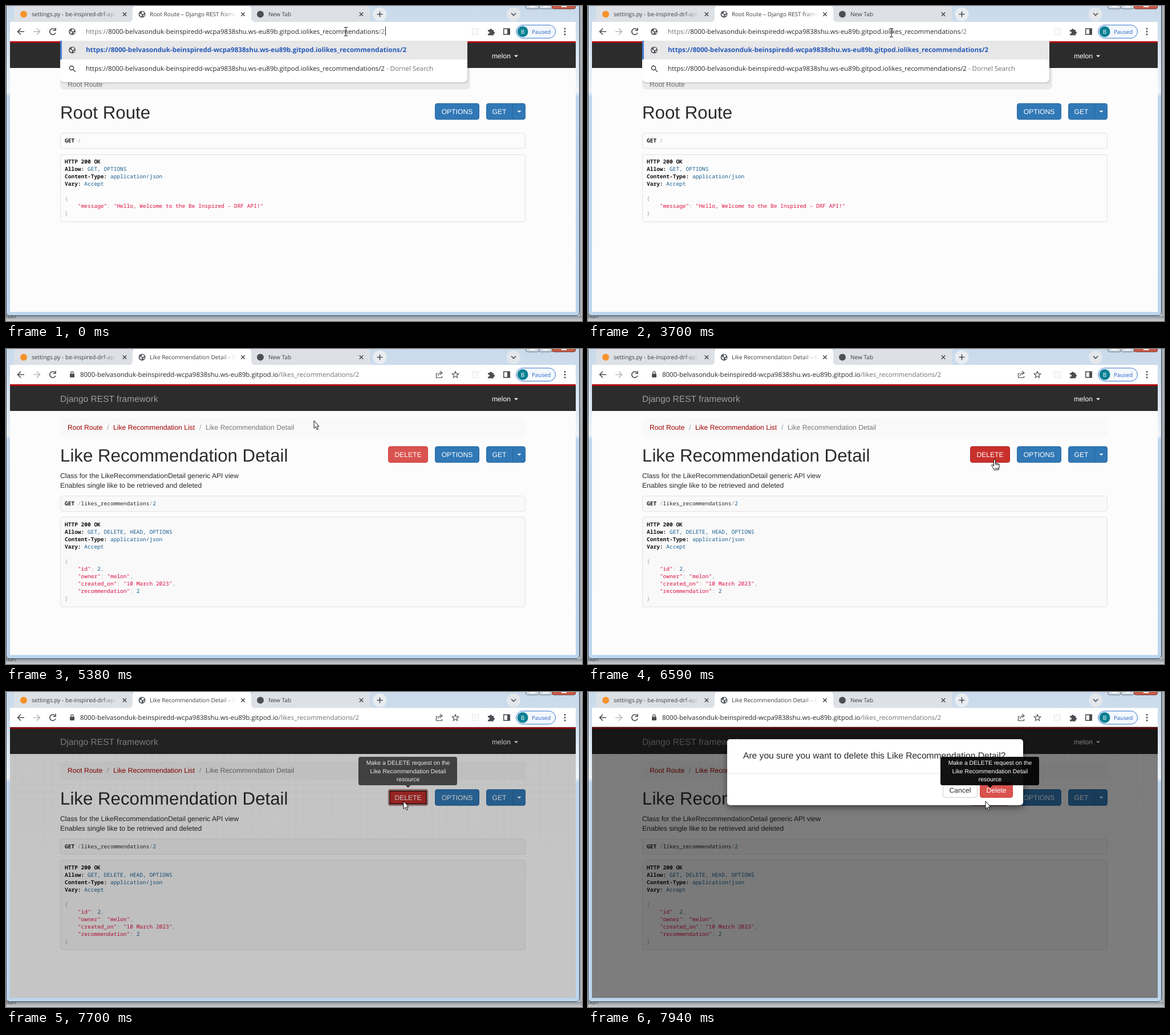
An HTML page that plays this animation: 1010x554 px, repeating every 7.99 s.

```html
<!DOCTYPE html>
<html lang="en">
<head>
<meta charset="utf-8">
<title>Deleting a like</title>
<style>
html, body { margin: 0; width: 100%; height: 100%; overflow: hidden; }
svg { display: block; width: 1010px; height: 554px; }
text { font: 12.15px "Liberation Sans", Arial, sans-serif; fill: #2a2a2a; white-space: pre; text-rendering: geometricPrecision; }
.ui { font: 10.1px "Open Sans", "Noto Sans", sans-serif; fill: #3c4043; }
.url { font: 11.48px "Open Sans", "Noto Sans", sans-serif; fill: #25282b; }
.pick { font: bold 11.6px "Open Sans", "Noto Sans", sans-serif; fill: #2558b8; }
.dim { fill: #6f7377; }
.h1 { font-size: 31.25px; }
.brand { font-size: 15.55px; fill: #9d9d9d; }
.link { fill: #a30000; }
.grey { fill: #777; }
.white { fill: #fff; }
.mid { text-anchor: middle; }
.tip { font-size: 10.4px; fill: #fff; text-anchor: middle; }
.ask { font-size: 15.6px; }
.code { font: 9.535px "Noto Sans Mono", "DejaVu Sans Mono", monospace; }
.b { font-weight: bold; fill: #111; }
.v { fill: #195f91; }
.s { fill: #d14; }
.p { fill: #93a1a1; }
.well { fill: var(--well); stroke: #e2e2e3; }
.icon { fill: none; stroke: #4a4d51; stroke-width: 1.6; }
.thin { stroke-width: 1.2; }
.raised { filter: drop-shadow(0 4px 6px rgba(0, 0, 0, .5)); }
</style>
</head>
<body>
<script>
const LOOP = 7990, LOADED = 4590, HOVER = 6480, MODAL = 7640;
const HOST = '8000-belvasonduk-beinspiredd-wcpa9838shu.ws-eu89b.gitpod.io';
const PATH = 'likes_recommendations';

const text = (x, y, cls, s) => `<text x="${x}" y="${y}" class="${cls}">${s}</text>`;
const rect = (x, y, w, h, fill, more = '') =>
  `<rect x="${x}" y="${y}" width="${w}" height="${h}" fill="${fill}" ${more}/>`;
const circle = (x, y, r, fill, more = '') => `<circle cx="${x}" cy="${y}" r="${r}" fill="${fill}" ${more}/>`;
const line = (d, cls = '') => `<path class="icon ${cls}" d="${d}"/>`;
const span = (cls, s) => `<tspan class="${cls}">${s}</tspan>`;
// Shown during each pair of times in the list
const during = (times, s) => `<g data-t="${times}">${s}</g>`;

const globe = (x, y) => circle(x, y, 6, '#55595d') +
  `<path d="M${x - 5} ${y - 1}l4 1 1 3-2 1zM${x} ${y - 5}l4 2-2 3-3-1zM${x + 2} ${y + 1}l3 0-2 3z" fill="#fff"/>`;
const cross = (x, y, r = 3.2) => line(`M${x - r} ${y - r}l${2 * r} ${2 * r}m0 ${-2 * r}l${-2 * r} ${2 * r}`);
const lens = (x, y) => line(`M${x + 2} ${y + 2}l4 4`) + circle(x - 1, y - 1, 3.6, 'none', 'class="icon"');
const caret = (x, times) => during(times, rect(x, 36, 1, 16, '#222'));
const down = (x, y) => `<path d="M${x - 3.5} ${y}h7l-3.5 3.5z" fill="#fff"/>`;

const button = (x, w, label, fill, edge) =>
  rect(x + .5, 171.5, w - 1, 28, fill, `rx="3.5" stroke="${edge}"`) + text(x + w / 2, 190, 'white mid', label);
const blue = (x, w, label) => button(x, w, label, '#3178b6', '#2e6da4');

const well = (y, h) => `<rect class="well" x="95.5" y="${y}.5" width="815" height="${h}" rx="3.5"/>`;
const code = (y, lines) => lines.map(([indent, s], i) =>
  text(103 + indent * 5.72, y + i * 13, 'code', s)).join('');
const head = (name, value) => [0, span('b', name + ':') + span('v', ' ' + value)];
const brace = s => [0, span('p', s)];
const pair = (key, value, end = ',') =>
  [4, span('s', `"${key}"`) + span('p', ': ') + value + span('p', end)];
const str = s => span('s', `"${s}"`);

function frame() {
  return rect(0, 0, 1010, 554, '#d4d7db') +
    rect(0, 545, 1010, 9, 'url(#shadowDown)') + rect(1006, 0, 4, 545, 'url(#shadowRight)') +
    text(-1, 549, 'ui', 'hon') +
    rect(.5, -9.5, 1005, 554, 'url(#glass)', 'rx="6" stroke="#434f5c"');
}

function strip() {
  const tab = (x, fill) => `<path d="M${x - 6} 28q6 0 6-7V6q0-8 8-8h192q8 0 8 8v15q0 7 6 7z" fill="${fill}"/>`;
  const fade = (x, id) => rect(x, 4, 30, 20, `url(#${id})`);
  const control = (x, w, fill, edge) => rect(x, -6, w, 11, fill, `rx="3" stroke="${edge}"`);
  return tab(14, '#dde1e6') + tab(430, '#dde1e6') + tab(222, '#fff') +
    circle(31, 14.5, 6, '#f5922b') + text(45, 18, 'ui', 'settings.py - be-inspired-drf-api') + fade(168, 'fadeTab') +
    during('0 4450 4680 7990', globe(238.5, 14.5)) +
    during('0 ' + LOADED, text(252, 18, 'ui', 'Root Route – Django REST frame')) +
    during(LOADED + ' 7990', text(252, 18, 'ui', 'Like Recommendation Detail – D')) + fade(378, 'fadeWhite') +
    circle(446, 14.5, 6, '#4c5054') + text(460, 18, 'ui', 'New Tab') +
    [208, 415.5, 623].map(x => cross(x, 14.5)).join('') +
    circle(655.5, 14.5, 12, '#e9edf1') + line('M650.5 14.5h10m-5-5v10') +
    circle(890, 14.5, 12, '#e3e7eb') + line('M886 12.5l4 4 4-4') +
    control(911.5, 23, '#d3dce6', '#62707f') + control(934.5, 23, '#d3dce6', '#62707f') +
    control(957.5, 41, '#cb5a45', '#6f3329') +
    rect(918, 0, 10, 2, '#fff') + rect(941, 0, 10, 2, '#fff') + rect(974, 0, 9, 2, '#fff');
}

function toolbar() {
  const typed = (slash, times) => during(times, text(140, 49, 'url',
    span('dim', 'https://') + HOST + (slash ? span('dim', `/${PATH}/2`) : PATH + span('dim', '/2'))));
  return rect(7, 28, 992, 34, '#fff') +
    line('M32 45H21m5-5.5l-5.5 5.5 5.5 5.5') +
    `<g opacity=".4">${line('M48 45h11m-5-5.5l5.5 5.5-5.5 5.5')}</g>` +
    during('0 4450 4680 7990', line('M86 41.5a5.3 5.3 0 1 0 1 5.5M87 38.5v4.5h-4.5')) +
    during('4450 4680', cross(82, 45, 4.4)) +
    during('0 4450', globe(116, 45)) +
    during('4450 4680', circle(116, 45, 5.3, 'none', 'class="icon thin"') + line('M116 44v4m0-6.5v1.2')) +
    during('4680 7990', rect(112, 43.5, 8, 6.5, '#4a4d51', 'rx="1"') + line('M113.8 44v-2a2.2 2.2 0 0 1 4.4 0v2', 'thin')) +
    typed('', '0 4130') + typed('/', '4130 4450') +
    during('4450 7990',
      text(130, 49, 'url', HOST + span('dim', `/${PATH}/2`)) +
      line('M757 43h-2.5v7.5h10v-3M757.5 47q1-5 6-5m-2.5-3l4 3-4 3', 'thin') +
      line('M788 39.5l1.6 3.8 4.1.3-3.1 2.7 1 4-3.6-2.2-3.6 2.2 1-4-3.1-2.7 4.1-.3z', 'thin')) +
    rect(817.5, 39.5, 11, 11, '#fafafa', 'stroke="#dedede" stroke-dasharray="2 1"') +
    '<path d="M845 42h3a2 2 0 1 1 4 0h3v3a2 2 0 1 1 0 4v2.5h-10v-3a2 2 0 1 0 0-3.5z" fill="#4a4d51"/>' +
    rect(872.7, 40, 10.5, 10, 'none', 'class="icon"') + rect(879, 40, 4, 10, '#4a4d51') +
    rect(894.5, 33.5, 69, 23, '#f3f8fe', 'rx="11.5" stroke="#3c78d0"') +
    circle(906, 45, 9.5, '#0b8093') + text(906, 48.5, 'ui white mid', 'B') +
    '<text x="922" y="48.5" class="ui" style="font-size:9.7px;fill:#2a62c4">Paused</text>' +
    [40, 45, 50].map(y => circle(980, y, 1.5, '#4a4d51')).join('');
}

function suggestions() {
  const rows = (slash, times) => during(times,
    text(140, 81, 'pick', `https://${HOST}${slash}${PATH}/2`) +
    text(140, 114, 'url', `https://${HOST}${slash}${PATH}/2` + span('dim', ' - Dornel Search')));
  return `<g id="drop" data-t="0 4530">
    <path d="M95 109h719v30q0 8-8 8H103q-8 0-8-8z" opacity=".07"/>
    <path d="M95 109h716v20q0 8-8 8H103q-8 0-8-8z" opacity=".09"/>
    <path d="M95 61h714v65q0 8-8 8H103q-8 0-8-8z" fill="#fff"/>
    ${rect(95, 61, 714, 33, '#e7e7e8')}${rect(95, 61, 3, 33, '#4b7fd3')}
    ${globe(116, 77.5)}${lens(116, 110)}
    ${rows('', '0 4130')}${rows('/', '4130 4530')}</g>`;
}

function page() {
  const oldPage =
    text(108, 142, 'grey', 'Root Route') + text(95, 198, 'h1', 'Root Route') +
    well(223, 27) + code(240, [[0, span('b', 'GET') + span('p', ' /')]]) +
    well(261, 118) + code(277, [
      [0, span('b', 'HTTP 200 OK')], head('Allow', 'GET, OPTIONS'),
      head('Content-Type', 'application/json'), head('Vary', 'Accept'), [0, ''],
      brace('{'), pair('message', str('Hello, Welcome to the Be Inspired - DRF API!'), ''), brace('}')]);
  const newPage =
    '<rect x="95" y="122" width="816" height="32" rx="3.5" style="fill:var(--well)"/>' +
    text(108, 142, 'link', 'Root Route') + text(177, 142, 'p', '/') +
    text(188, 142, 'link', 'Like Recommendation List') + text(339, 142, 'p', '/') +
    text(350, 142, 'grey', 'Like Recommendation Detail') +
    text(95, 198, 'h1', 'Like Recommendation Detail') +
    text(95, 227, '', 'Class for the LikeRecommendationDetail generic API view') +
    text(95, 244, '', 'Enables single like to be retrieved and deleted') +
    well(258, 27) + code(275, [[0, span('b', 'GET') + span('p', ' /') + PATH + span('p', '/') + span('v', '2')]]) +
    well(295, 158) + code(312, [
      [0, span('b', 'HTTP 200 OK')], head('Allow', 'GET, DELETE, HEAD, OPTIONS'),
      head('Content-Type', 'application/json'), head('Vary', 'Accept'), [0, ''],
      brace('{'), pair('id', span('v', '2')), pair('owner', str('melon')),
      pair('created_on', str('10 March 2023')), pair('recommendation', span('v', '2'), ''), brace('}')]) +
    during(`${LOADED} ${HOVER}`, button(670, 70, 'DELETE', '#d9534f', '#d43f3a')) +
    during(HOVER + ' 7460', button(670, 70, 'DELETE', '#c9302c', '#ac2925')) +
    during('7460 7990', button(670, 70, 'DELETE', '#bd2d2a', '#8f3a36') +
      rect(671.5, 172.5, 67, 26, 'none', 'rx="3" stroke="#fff"') +
      rect(672.75, 173.75, 64.5, 23.5, 'none', 'rx="2" stroke="#111" stroke-width="1.5"'));
  return rect(7, 61, 992, 477, '#fcfcfc') +
    during(MODAL + ' 7990', rect(7, 109, 992, 220, 'url(#grid)', 'mask="url(#fadeDown)"')) +
    rect(7, 61, 992, 5, '#b00d10') + rect(7, 65, 992, 44, '#2c2c2c') +
    text(95, 93, 'brand', 'Django REST framework') +
    text(852, 92, 'white', 'melon') + down(894.5, 86.5) +
    during('0 ' + LOADED, oldPage) + during(LOADED + ' 7990', newPage) +
    blue(752, 78, 'OPTIONS') + blue(842, 69, '') + text(865, 190, 'white mid', 'GET') +
    rect(888, 172, 1, 27, '#2a659b') + down(900, 184);
}

function dialog() {
  return rect(7, 61, 992, 477, '#000', 'id="shade"') +
    `<g clip-path="url(#view)"><g id="modal">
    ${rect(244, 83, 519, 116, '#fff', 'rx="5" class="raised"')}
    ${text(272, 117, 'ask', 'Are you sure you want to delete this Like Recommendation Detail?')}
    ${rect(244, 143, 519, 1, '#e8e8e8')}
    ${rect(622.5, 158.5, 60, 27, '#fff', 'rx="3.5" stroke="#ccc"')}${text(652.5, 176.5, 'mid', 'Cancel')}
    ${rect(687.5, 158.5, 57, 27, '#d9534f', 'rx="3.5" stroke="#d43f3a"')}${text(716, 176.5, 'white mid', 'Delete')}</g></g>
    <g id="tip">${rect(618, 114, 173, 50, '#000', 'rx="3.5"')}<path d="M700.5 164h9l-4.5 4.5z"/>
    ${text(705, 128, 'tip', 'Make a DELETE request on the')}
    ${text(705, 143, 'tip', 'Like Recommendation Detail')}${text(705, 157, 'tip', 'resource')}</g>`;
}

const pointer = `<g id="mouse">
  ${during('0 5380', '<path d="M-3-7.5h2.3L0-7l.7-.5H3M0-7V7M-3 7.5h2.3L0 7l.7.5H3" fill="none" stroke="#111"/>')}
  ${during(`5380 ${HOVER} ${MODAL} 7990`, '<path d="M0 0v13.5l3.1-2.7 2.3 5 2-.9-2.2-4.9H9z" fill="#fff" stroke="#111"/>')}
  ${during(`${HOVER} ${MODAL}`, '<path d="M-1.5 1a1.5 1.5 0 0 1 3 0v5l5 1q2 .5 2 2.5L7 17.5H-1L-5 10q-.5-2 1.5-1.5L-1.5 11z" fill="#fff" stroke="#111"/><path d="M1.5 6v3M4 7v2.5M6.3 7.5v2.5M0 15h7" fill="none" stroke="#111"/>')}</g>`;

// Even stops are written as "offset colour [opacity]"
const gradient = (id, end, ...stops) => `<linearGradient id="${id}" ${end}>` + stops.map(s => {
  const [at, colour, alpha = 1] = s.split(' ');
  return `<stop offset="${at}" stop-color="${colour}" stop-opacity="${alpha}"/>`;
}).join('') + '</linearGradient>';
const VERTICAL = 'x2="0" y2="1"';

document.body.innerHTML = `<svg viewBox="0 0 1010 554"><defs>
  ${gradient('fadeWhite', '', '0 #fff 0', '.85 #fff')}
  ${gradient('fadeTab', '', '0 #dde1e6 0', '.9 #dde1e6')}
  ${gradient('down', VERTICAL, '0 #fff', '.6 #bbb', '1 #000')}
  ${gradient('glass', VERTICAL, '0 #c8d9eb', '.1 #cfdeed', '.29 #eef4fa', '.305 #c0d7ee', '1 #bcd6ee')}
  ${gradient('shadowDown', VERTICAL, '0 #8f949a', '1 #cdd0d4')}
  ${gradient('shadowRight', '', '0 #8f949a', '1 #bfc4ca')}
  <pattern id="grid" x="54" y="62" width="12.6" height="12.6" patternUnits="userSpaceOnUse"><path d="M.5 0v12.6M0 .5h12.6" stroke="#f3f3f3"/></pattern>
  <mask id="fadeDown">${rect(7, 109, 992, 220, 'url(#down)')}</mask>
  <clipPath id="view">${rect(7, 61, 992, 477, '#000')}</clipPath></defs>
  ${frame()}${strip()}${page()}${toolbar()}${suggestions()}
  ${caret(665, '0 190 690 1250 1700 2180')}${caret(531, '2180 2680')}${caret(528, '3170 3700')}${caret(533, '4130 4450')}
  ${dialog()}${pointer}</svg>`;

// Pointer path: time, x, y
const route = [
  [0, 596, 45], [360, 596, 45], [690, 493, 47], [920, 523, 48], [1200, 523, 48], [1410, 538, 47],
  [1540, 538, 47], [1880, 532, 47], [5320, 532, 47], [5380, 540, 125], [5440, 560, 180], [5500, 620, 215],
  [5560, 680, 247], [5830, 680, 247], [5950, 640, 275], [6060, 580, 315], [6150, 525, 355], [6220, 560, 363],
  [6300, 630, 340], [6380, 695, 295], [6440, 710, 240], [6500, 713, 199], [6590, 713, 195],
  [6790, 713, 195], [7070, 697, 192], [LOOP, 697, 192]];
// Time, shade, tooltip and dialog opacity, dialog offset
const fades = [[0, 0, 0, 0, 0], [MODAL, .05, .35, 0, 0], [7700, .22, .66, 0, 0],
  [7780, .44, .85, 0, 0], [7860, .5, .9, .5, -15], [7940, .5, .93, 1, 0]];

const $ = id => document.getElementById(id);
const timed = [...document.querySelectorAll('[data-t]')].map(el => [el, el.dataset.t.split(' ').map(Number)]);

function draw(now) {
  const t = now % LOOP;
  for (const [el, times] of timed) {
    const on = times.some((a, i) => i % 2 == 0 && t >= a && t < times[i + 1]);
    el.style.display = on ? '' : 'none';
  }
  const i = route.findIndex(p => p[0] > t), [a, x, y] = route[i - 1], [b, u, v] = route[i];
  const k = (t - a) / (b - a);
  $('mouse').setAttribute('transform', `translate(${Math.round(x + (u - x) * k)} ${Math.round(y + (v - y) * k)})`);

  const [, shade, tip, modal, dy] = fades.findLast(f => f[0] <= t);
  $('shade').style.opacity = shade;
  $('tip').style.opacity = tip;
  $('modal').style.opacity = modal;
  $('modal').setAttribute('transform', `translate(0 ${dy})`);
  $('drop').style.opacity = t < 4450 ? 1 : .85;
  document.body.style.setProperty('--well', t < LOADED ? '#fcfcfc' : t < MODAL ? '#f9f9f9' : '#f5f5f5');
  requestAnimationFrame(draw);
}
requestAnimationFrame(draw);
</script>
</body>
</html>
```
